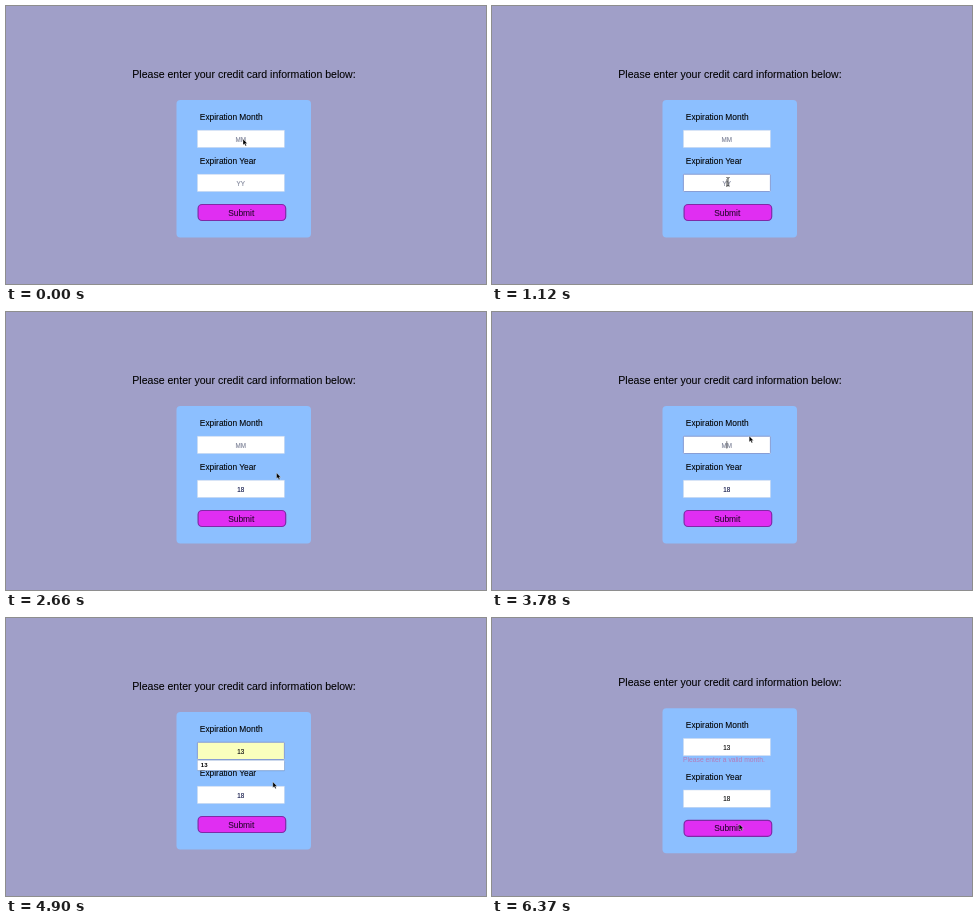
Recreate the animation shown at these times as an HTML page. Size 480 px wide and 278 px high, loop 6.44 s.

```html
<!DOCTYPE html>
<html lang="en">
<head>
<meta charset="utf-8">
<title>Card expiration form</title>
<style>
  html, body { margin: 0; width: 100%; height: 100%; overflow: hidden; background: #a09fc8; }
  svg { display: block; width: 480px; height: 278px; font-family: "Liberation Sans", Arial, sans-serif; }
  .title { font-size: 10.55px; text-anchor: middle; }
  .label { font-size: 8.4px; }
  .title, .label { stroke: #000; stroke-width: .08; }
  .value { font-size: 6.3px; text-anchor: middle; stroke: currentColor; stroke-width: .14; fill: currentColor; }
  .item { font-size: 6px; font-weight: bold; }
  .error { font-size: 6.75px; fill: #b57bb8; }
  .submit { font-size: 8.4px; text-anchor: middle; fill: #28062e; stroke: #28062e; stroke-width: .08; }
  .box { fill: #fff; stroke: #c3d3ec; stroke-width: .5; }
  .ring { fill: none; stroke: #8298d2; stroke-width: .9; }
  .list { fill: #fff; stroke: #a3b2d0; stroke-width: .4; }
  .shade { fill: #30406a; opacity: .2; }
  .caret { stroke: #222; stroke-width: .6; }
</style>
</head>
<body>
<svg viewBox="0 0 480 278">
  <rect width="480" height="278" fill="#a09fc8"/>
  <rect id="card" x="170.5" width="134.5" rx="4" fill="#8cbfff"/>
  <g id="upper">
    <text class="title" x="238" y="72.3">Please enter your credit card information below:</text>
    <g id="month"></g>
    <text class="error" id="error" x="191" y="147.6">Please enter a valid month.</text>
  </g>
  <g id="lower">
    <g id="year"></g>
    <rect x="192.1" y="198.5" width="87.6" height="16" rx="4" fill="#e02ef2" stroke="#7f2aa6" stroke-width="1.2"/>
    <text class="submit" x="235.2" y="209.7">Submit</text>
  </g>
  <g id="yearList"></g>
  <g id="monthList"></g>
  <g id="pointer">
    <path id="arrow" d="M0 0v6l1.4-1.2 1 2.2 1.1-.5-1-2.1h1.8z" stroke="#fff" stroke-width=".35"/>
    <path id="beam" d="M-1.6-4.3Q0-4.3 0-3.3 0-4.3 1.6-4.3M0-3.3V3.5M-1.6 4.4Q0 4.4 0 3.4 0 4.4 1.6 4.4" fill="none" stroke="#222" stroke-width=".8"/>
  </g>
</svg>
<script>
const LOOP = 6440, STEP = 70, SHIFT = 3.8;
const LEFT = 191.4, MID = 234.8, MONTH = 124.2, YEAR = 168.2, ROW = 10;

// Moments of the session, in ms
const yearFocus = 1120, yearType = 1470, yearMove = 2100, yearBlur = 2450;
const monthFocus = 3290, monthType = 3990, monthMove = 4760;
const press = 5950, rejected = 6020;

const $ = id => document.getElementById(id);
const show = (el, on) => el.setAttribute("visibility", on ? "visible" : "hidden");
const move = (el, x, y) => el.setAttribute("transform", `translate(${x} ${y})`);

function buildField(id, y, label) {
  $(id).innerHTML = `
    <text class="label" x="193.8" y="${y - 10.3}">${label}</text>
    <rect class="box" x="${LEFT}" y="${y}" width="87" height="17.3"/>
    <rect class="ring" x="${LEFT}" y="${y}" width="87" height="17.3" rx=".8"/>
    <text class="value" x="${MID}" y="${y + 11.3}"></text>
    <path class="caret" d="M0 ${y + 5}v7.4"/>`;
}

function buildList(id, y, items) {
  const h = items.length * ROW;
  $(id).innerHTML = `
    <rect class="shade" x="${LEFT}" y="${y + 1}" width="87.6" height="${h}" rx="1"/>
    <rect class="list" x="${LEFT}" y="${y}" width="86.8" height="${h}"/>` +
    items.map((s, i) => `<text class="item" x="194.8" y="${y + 7.2 + i * ROW}">${s}</text>`).join("");
}

function drawField(id, { value, hint, focus, caret, ink = "#111", fill = "#fff" }) {
  const part = name => $(id).querySelector(name);
  part(".value").textContent = value || hint;
  part(".value").style.color = value ? ink : "#81869a";
  part(".box").style.fill = fill;
  show(part(".ring"), focus);
  show(part(".caret"), caret);
  move(part(".caret"), MID + value.length * 1.9, 0);
}

function pointerAt(t) {
  let x = 237, y = 133;
  const glide = (from, to, nx, ny) => {
    const k = Math.min(1, Math.max(0, (t - from) / (to - from)));
    const e = k * k * (3 - 2 * k);
    x += (nx - x) * e;
    y += (ny - y) * e;
  };
  glide(0, 420, 238, 158);
  glide(700, 1050, 236, YEAR + 7.6);
  glide(yearMove, yearBlur, 284, 176);
  glide(yearBlur, 2730, 268, 158);
  glide(2870, 3220, 257.2, MONTH + 8);
  glide(3710, 3780, 257.2, MONTH - .2);
  glide(4690, 4900, 266.8, 163.8);
  glide(4900, 5390, 250.5, 181);
  glide(5460, press, 245, 204);
  glide(6160, 6370, 247.2, 206);
  return [x, y];
}

function draw(ms) {
  const t = Math.floor(ms / STEP) * STEP;
  const during = (a, b) => t >= a && t < b;
  const typed = (text, from, gap) => text.slice(0, t < from ? 0 : 1 + Math.floor((t - from) / gap));
  const invalid = t >= rejected;
  const shift = invalid ? SHIFT : 0;

  move($("upper"), 0, -shift);
  move($("lower"), 0, shift);
  $("card").setAttribute("y", 94 - shift);
  $("card").setAttribute("height", 137.5 + 2 * shift);
  show($("error"), invalid);

  const preview = during(monthMove + STEP, monthMove + 3 * STEP);
  drawField("month", {
    value: typed("13", monthType, 280),
    hint: "MM",
    focus: during(monthFocus, press),
    caret: during(monthFocus + 350, press) && !preview,
    fill: preview ? "#faffbd" : "#fff"
  });
  drawField("year", {
    value: typed("18", yearType, 140),
    hint: "YY",
    focus: during(yearFocus, yearBlur),
    caret: during(yearFocus, yearBlur),
    ink: during(yearBlur, rejected) ? "#141a4a" : "#111"
  });
  show($("yearList"), during(yearType, yearBlur));
  show($("monthList"), during(monthType, press));

  const typing = during(yearType, yearMove) || during(monthType, monthMove);
  const beam = during(980, 2240) || during(3150, 3780);
  move($("pointer"), ...pointerAt(t));
  show($("arrow"), !typing && !beam);
  show($("beam"), !typing && beam);
}

buildField("month", MONTH, "Expiration Month");
buildField("year", YEAR, "Expiration Year");
buildList("monthList", MONTH + 18, ["13"]);
buildList("yearList", YEAR + 18, ["18", "188"]);

const start = performance.now();
function tick() {
  draw((performance.now() - start) % LOOP);
  requestAnimationFrame(tick);
}
tick();
</script>
</body>
</html>
```
